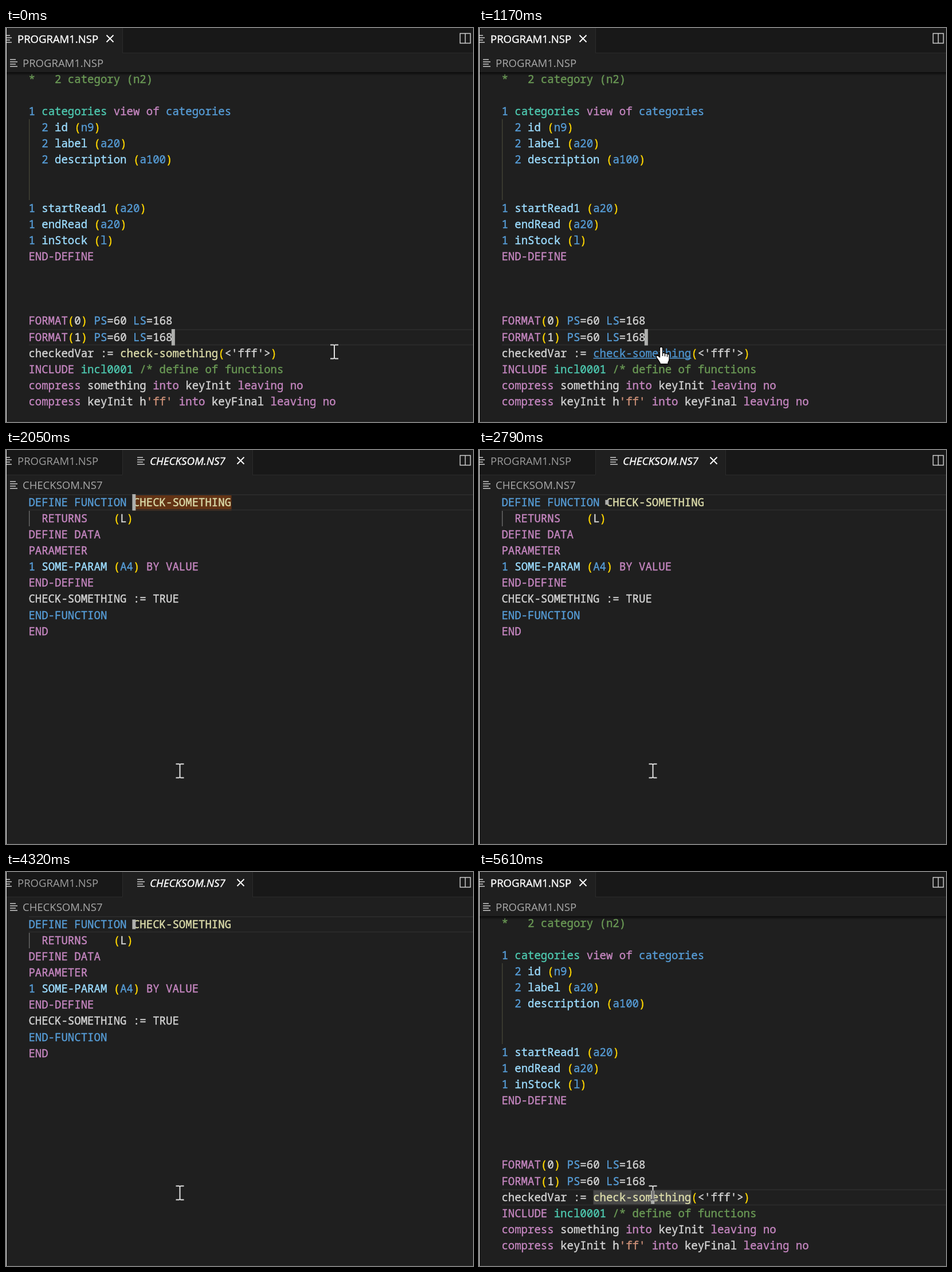
Write an HTML page that moves like this. It is 815 px wide and 687 px high and loops after 5.68 s.

```html
<!DOCTYPE html>
<html lang="en">
<head>
<meta charset="utf-8">
<title>Go to definition</title>
<style>
html, body { margin: 0; width: 100%; height: 100%; overflow: hidden; background: #1f1f1f; }
svg { display: block; width: 100vw; height: 100vh; }
text { white-space: pre; stroke-width: .4; }
.code text { font: 19.02px "Noto Sans Mono", "DejaVu Sans Mono", monospace; }
.ui { font: 18.5px "Open Sans", "Noto Sans", sans-serif; }
.on { fill: #fff; stroke: #fff; }
.off { fill: #9d9d9d; }
.crumb { fill: #a9a9a9; }
.line { fill: none; stroke: #ccc; stroke-width: 1.5; }
</style>
</head>
<body>
<svg viewBox="0 0 815 687">
  <defs>
    <linearGradient id="shade" x2="0" y2="1">
      <stop stop-color="#000" stop-opacity=".65"/>
      <stop offset="1" stop-color="#000" stop-opacity="0"/>
    </linearGradient>
    <path id="list" class="line" d="M0 1h10M0 5h13M0 9h10M0 13h13"/>
    <path id="close" fill="none" stroke="#fff" stroke-width="1.9" d="M-6-6L6 6M6-6L-6 6"/>
  </defs>
  <rect width="815" height="687" fill="#1f1f1f"/>
  <rect width="815" height="43" fill="#181818"/>
  <rect y="43" width="815" height="1" fill="#2b2b2b"/>

  <g id="pageA">
    <rect width="203" height="44" fill="#1f1f1f"/>
    <rect x="203" width="1" height="43" fill="#2b2b2b"/>
    <text class="ui on" x="20" y="26">PROGRAM1.NSP</text>
    <use href="#close" x="181.5" y="18.5"/>
    <text class="ui crumb" x="29" y="68">PROGRAM1.NSP</text>
    <rect x="40" y="159" width="1.3" height="141" fill="#454537"/>
    <rect id="word" x="199.5" y="553" width="171" height="28" fill="#494949"/>
    <g id="codeA" class="code"></g>
    <rect id="under" x="199.5" y="575" width="171" height="1.5" fill="#4e94ce"/>
    <rect y="77" width="815" height="6" fill="url(#shade)"/>
  </g>

  <g id="pageB">
    <rect x="203" width="227" height="44" fill="#1f1f1f"/>
    <path d="M203.5 0V43M430.5 0V43" stroke="#2b2b2b"/>
    <text class="ui off" x="20" y="26">PROGRAM1.NSP</text>
    <use href="#list" x="229" y="12"/>
    <text class="ui on" x="251" y="26" style="font-style:italic;font-size:18.9px">CHECKSOM.NS7</text>
    <use href="#close" x="409.5" y="18.5"/>
    <text class="ui crumb" x="29" y="68">CHECKSOM.NS7</text>
    <rect x="40" y="106" width="1.3" height="27" fill="#707070"/>
    <rect id="flash" x="221.5" y="77" width="172" height="29" fill="#633315"/>
    <g id="codeB" class="code"></g>
  </g>

  <use href="#list" x="-3" y="12"/>
  <use href="#list" x="7" y="54"/>
  <path class="line" d="M792.5 9.5h18v17h-18zM801.5 9.5v17"/>
  <path id="current" d="M40 1H815M40 27.5H815" stroke="#2a2a2a" stroke-width="2"/>
  <rect id="caret" width="6" fill="#aeafad"/>
  <path id="beam" style="mix-blend-mode:difference" fill="none" stroke="#fff" stroke-width="2"
        d="M-7-12h5.5L0-11L1.5-12H7M0-11V11M-7 12h5.5L0 11L1.5 12H7"/>
  <g id="hand" stroke="#000" stroke-width="1.3" stroke-linejoin="round">
    <path fill="#fff" d="M-2.5 1.5a2.5 2.5 0 0 1 5 0V10q3-1.5 4 .8q3-1.2 4 1q3.2-.8 3.5 2V20q0 4-2 6V29H-2V27Q-5 22-8.5 17.5Q-9.5 14-6.5 14Q-4.5 14.5-2.5 17Z"/>
    <path d="M2.5 10v5M6.5 11v4.5M10.5 12.5v4"/>
  </g>
  <path d="M0 686.5H815" stroke="#2b2b2b"/>
  <path d="M.5 0V687" stroke="#e8e8e8"/>
</svg>
<script>
const LOOP = 5680, CHAR = 11.41, LEFT = 39.4, ROW = 28.1;
const $ = id => document.getElementById(id);
const show = (el, on) => el.setAttribute('visibility', on ? 'visible' : 'hidden');
const move = (el, x, y) => el.setAttribute('transform', `translate(${x} ${y})`);

// Each run of text starts with its colour key.
const INK = {
  g: '#6a9955', b: '#569cd6', t: '#4ec9b0', p: '#c586c0', v: '#9cdcfe',
  y: '#ffd700', w: '#d4d4d4', f: '#dcdcaa', s: '#ce9178'
};
const paren = (key, s) => `y(|${key}${s}|y)`;
const field = (name, type) => `b  2 |v${name} |${paren('b', type)}`;
const variable = (name, type) => `b1 |v${name} |${paren('b', type)}`;
const format = n => `pFORMAT|${paren('w', n)}|b PS|w=60 |bLS|w=168`;

const codeA = [
  'g*   2 category (n2)', '',
  'b1 |tcategories |pview of |bcategories',
  field('id', 'n9'), field('label', 'a20'), field('description', 'a100'), '', '',
  variable('startRead1', 'a20'), variable('endRead', 'a20'), variable('inStock', 'l'),
  'pEND-DEFINE', '', '', '',
  format(0), format(1),
  `wcheckedVar := |fcheck-something|${paren('w', "<'fff'>")}`,
  'pINCLUDE |tincl0001 |g/* define of functions',
  'pcompress |wsomething |pinto |wkeyInit |pleaving no',
  "pcompress |wkeyInit h|s'ff' |pinto |wkeyFinal |pleaving no"
];
const codeB = [
  'bDEFINE FUNCTION |fCHECK-SOMETHING',
  `p  RETURNS    |${paren('w', 'L')}`,
  'pDEFINE DATA', 'pPARAMETER',
  `b1 |vSOME-PARAM |${paren('b', 'A4')}|p BY VALUE`,
  'pEND-DEFINE', 'wCHECK-SOMETHING := TRUE', 'bEND-FUNCTION', 'pEND'
];

function svg(tag, parent) {
  return parent.appendChild(document.createElementNS('http://www.w3.org/2000/svg', tag));
}
function paint(el, colour) {
  el.setAttribute('fill', colour);
  el.setAttribute('stroke', colour);
}
function typeset(rows, group, base) {
  rows.forEach((row, i) => {
    if (!row) return;
    const text = svg('text', group);
    text.setAttribute('x', LEFT);
    text.setAttribute('y', Math.round(base + i * ROW));
    for (const run of row.split('|')) {
      const span = svg('tspan', text);
      paint(span, INK[run[0]]);
      span.textContent = run.slice(1);
    }
  });
}
typeset(codeA, $('codeA'), 95.9);
typeset(codeB, $('codeB'), 97.8);
const call = [...$('codeA').querySelectorAll('tspan')].find(s => s.textContent === 'check-something');

// Caret phases: start, end, steps, growing.
const BLINK = [
  [200, 480, 5, 0], [680, 960, 5, 1], [1310, 1510, 4, 0], [1710, 1910, 2, 1],
  [1910, 1910, 1, 1], [2580, 2930, 6, 0], [3140, 3430, 5, 1], [3700, 3980, 5, 0],
  [4180, 4460, 5, 1], [4390, 4390, 1, 1], [4790, 5200, 6, 0], [5470, 5680, 4, 1]
];
function caretScale(t) {
  const phase = BLINK.filter(p => p[0] <= t).pop();
  if (!phase) return 1;
  const [start, end, n, grow] = phase;
  const step = (end - start) / (n - 1 || 1) || 1;
  const k = Math.min(n - 1, Math.floor((t - start) / step + 1e-6));
  const eased = (1 - Math.cos(Math.PI * (k + .5) / (n - .5))) / 2;
  return grow ? eased : 1 - eased;
}

// Pointer path: time, x, y.
const PATH = [
  [680, 573, 564.5], [750, 560, 572], [820, 520, 586], [890, 465, 592], [960, 405, 585],
  [1030, 360, 572], [1100, 331, 562], [1170, 318, 557], [1240, 311, 560], [1520, 303.5, 559.5]
];
function pointer(t) {
  const s = 680 + Math.floor((t - 680) / 70 + 1e-6) * 70;
  const i = PATH.findIndex(p => p[0] > s);
  if (i < 1) return (i ? PATH[PATH.length - 1] : PATH[0]).slice(1);
  const [a, b] = [PATH[i - 1], PATH[i]], f = (s - a[0]) / (b[0] - a[0]);
  return [a[1] + (b[1] - a[1]) * f, a[2] + (b[2] - a[2]) * f];
}

function draw(t) {
  const inB = t >= 2050 && t < 4390;
  const link = t >= 1030 && t < 2050;
  const hand = t >= 1030 && t < 1980;
  $('pageA').style.display = inB ? 'none' : '';
  $('pageB').style.display = inB ? '' : 'none';
  show($('word'), t >= 1980 && t < 2050 || t >= 4590);
  show($('under'), link);
  show($('flash'), t < 2380);
  paint(call, link ? '#4e94ce' : INK.f);

  const [col, top] = inB ? [16, 77] : t < 1910 ? [22, 525] : [23, 553];
  const height = 28.5 * caretScale(t);
  move($('current'), 0, top);
  move($('caret'), LEFT + col * CHAR - 1.6, top + (28.5 - height) / 2);
  $('caret').setAttribute('height', height);

  const [x, y] = pointer(t);
  show($('hand'), hand);
  show($('beam'), !hand);
  move($('hand'), x, y);
  move($('beam'), x, y);
}

const begin = performance.now();
function tick() {
  draw((performance.now() - begin) % LOOP);
  requestAnimationFrame(tick);
}
tick();
</script>
</body>
</html>
```
